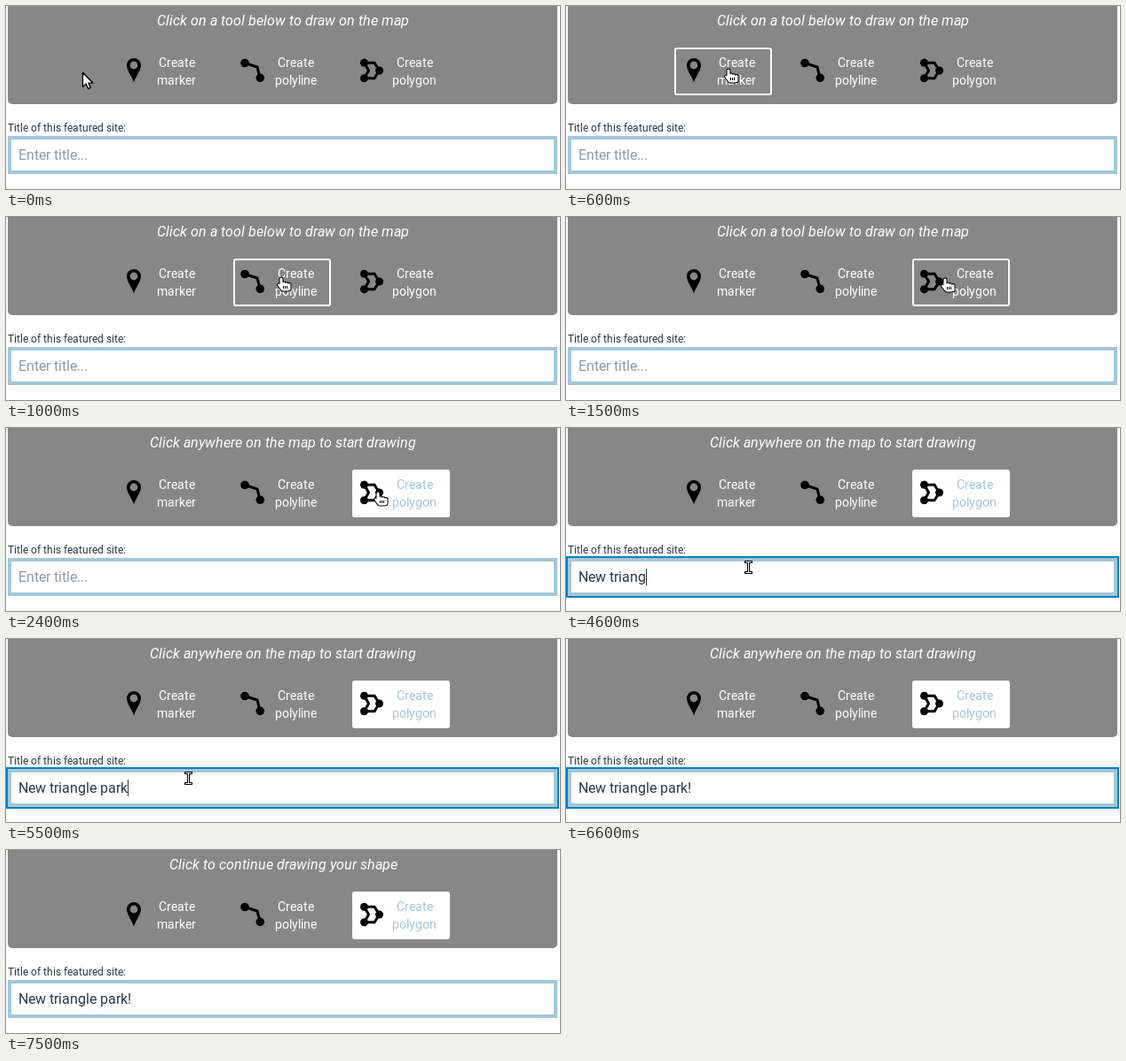
Recreate the animation shown at these times as an HTML page with a canvas. Size 624 by 207 pixels, loop 8 s.

```html
<!DOCTYPE html>
<html lang="en">
<head>
<meta charset="utf-8">
<title>Drawing tools</title>
<style>
html, body { margin: 0; width: 100%; height: 100%; overflow: hidden; background: #fff; }
canvas { display: block; width: 624px; height: 207px; }
</style>
</head>
<body>
<canvas id="stage" width="624" height="207"></canvas>
<script>
const ctx = document.getElementById('stage').getContext('2d');
const LOOP = 8000, STEP = 100;
const GRAY = '#878787', BLUE = '#a3c7d8', INK = '#2d3a44', FAINT = '#939ba2';

const tools = [
  { name: 'marker', icon: markerIcon },
  { name: 'polyline', icon: polylineIcon },
  { name: 'polygon', icon: polygonIcon }
];
tools.forEach((tool, i) => { tool.x = 122 + 134 * i; });

const hints = [
  [0, 'Click on a tool below to draw on the map'],
  [1800, 'Click anywhere on the map to start drawing'],
  [7400, 'Click to continue drawing your shape']
];

// [first step, number of steps, letters]
const bursts = [
  [3700, 2, 'New'], [4000, 1, ' t'], [4200, 5, 'riang'],
  [4800, 3, 'le '], [5300, 3, 'park'], [5700, 1, '!']
];

// [start, end, x, y]
const moves = [
  [200, 1100, 318, 69], [1100, 1500, 427, 70],
  [2300, 3200, 206, 158], [6300, 6500, 60, 146]
];

const clamp = u => Math.max(0, Math.min(1, u));
const smooth = u => u * u * (3 - 2 * u);
const fade = (t, from) => clamp((t - from + STEP) / (2 * STEP));

function pointerAt(t) {
  let x = 86, y = 75;
  for (const [start, end, toX, toY] of moves) {
    const k = smooth(clamp((t - start) / (end - start)));
    x += (toX - x) * k;
    y += (toY - y) * k;
  }
  return [Math.round(x), Math.round(y)];
}

function typedAt(t) {
  return bursts.map(([start, steps, letters]) => {
    const done = Math.max(0, Math.min(steps, (t - start) / STEP + 1));
    return letters.slice(0, Math.ceil(letters.length * done / steps));
  }).join('');
}

// Sets text with whole-pixel advances and returns its right edge.
function text(str, x, y, font, color, centered) {
  ctx.font = font + ' Roboto, sans-serif';
  ctx.fillStyle = color;
  const advance = ch => Math.round(ctx.measureText(ch).width);
  if (centered) {
    const width = [...str].reduce((sum, ch) => sum + advance(ch), 0);
    x = Math.round(x - width / 2);
  }
  for (const ch of str) {
    ctx.fillText(ch, x, y);
    x += advance(ch);
  }
  return x;
}

function rect(x, y, w, h, color) {
  ctx.fillStyle = color;
  ctx.fillRect(x, y, w, h);
}

function roundRect(x, y, w, h, r) {
  ctx.beginPath();
  ctx.roundRect(x, y, w, h, r);
}

function line(points, width, color, close) {
  ctx.beginPath();
  points.forEach(([x, y]) => ctx.lineTo(x, y));
  if (close) ctx.closePath();
  ctx.lineWidth = width;
  ctx.strokeStyle = color;
  ctx.stroke();
}

function dots(points, r) {
  ctx.fillStyle = '#000';
  for (const [x, y] of points) {
    ctx.beginPath();
    ctx.arc(x, y, r, 0, 7);
    ctx.fill();
  }
}

// Icons are placed relative to the button's top left corner.
function markerIcon() {
  ctx.beginPath();
  ctx.moveTo(22, 39.5);
  ctx.bezierCurveTo(20, 33, 14, 26, 14, 20);
  ctx.arc(22, 20, 8, Math.PI, 0);
  ctx.bezierCurveTo(30, 26, 24, 33, 22, 39.5);
  ctx.closePath();
  ctx.moveTo(26.4, 20);
  ctx.arc(22, 20, 4.4, 0, 2 * Math.PI);
  ctx.fillStyle = '#000';
  ctx.fill('evenodd');
}

function polylineIcon() {
  line([[13, 17.5], [27, 22], [30, 34]], 3, '#000');
  dots([[13, 17.5], [30.3, 34.3]], 4.8);
}

function polygonIcon() {
  const top = 17.3, mid = 26, bottom = 34.7;
  line([[13.5, top], [25, top], [30.5, mid], [25, bottom], [13.5, bottom], [18.5, mid]], 3, '#000', true);
  dots([[13.5, top], [13.5, bottom], [30.5, mid]], 4.5);
}

function drawTool(tool, hover, picked) {
  ctx.save();
  ctx.translate(tool.x, 47);
  if (hover) {
    roundRect(1, 1, 108, 52, 2);
    ctx.lineWidth = 2;
    ctx.strokeStyle = '#fff';
    ctx.stroke();
  }
  if (picked) {
    roundRect(0, 0, 110, 54, 3);
    ctx.fillStyle = `rgba(255,255,255,${picked})`;
    ctx.fill();
  }
  tool.icon();
  const color = picked ? BLUE : '#fff';
  text('Create', 70.5, 22, '14px', color, true);
  text(tool.name, 70, 42, '14px', color, true);
  ctx.restore();
}

function arrow() {
  line([[0.5, 0.5], [0.5, 16.3], [4.2, 12.9], [6.7, 18.6], [9.2, 17.4], [6.8, 12], [11.8, 12]], 1.2, '#000', true);
  ctx.fillStyle = '#fff';
  ctx.fill();
  ctx.stroke();
}

function hand() {
  const shape = new Path2D();
  shape.roundRect(-1.5, -0.5, 3, 11, 1.5);
  for (let i = 0; i < 3; i++) shape.roundRect(1.5 + 3 * i, 4.5 + 0.7 * i, 3, 8, 1.5);
  shape.roundRect(-0.5, 7.5, 10.5, 7, [1, 1, 3, 3]);
  shape.moveTo(-0.5, 13);
  shape.lineTo(-4.2, 7.5);
  shape.lineTo(-2.5, 6.5);
  shape.lineTo(0, 9);
  shape.closePath();
  ctx.lineWidth = 2;
  ctx.strokeStyle = '#000';
  ctx.stroke(shape);
  ctx.fillStyle = '#fff';
  ctx.fill(shape);
  for (let i = 0; i < 3; i++) rect(2 + 2 * i, 9, 1, 3, '#000');
}

function beam() {
  ctx.translate(-0.5, -0.5);
  ctx.lineCap = 'square';
  for (const [width, color] of [[3, '#000'], [1, '#fff']]) {
    line([[0, -6], [0, 6]], width, color);
    for (const y of [-6, 6]) line([[-3, y], [3, y]], width, color);
  }
}

function drawPointer(shape, x, y) {
  ctx.save();
  ctx.translate(x, y);
  ctx.lineJoin = 'round';
  shape();
  ctx.restore();
}

function drawField(t) {
  const focus = fade(t, 3100) - fade(t, 7400);
  rect(0, 145, 623, 47, `rgba(6,125,186,${focus})`);
  rect(2, 147, 619, 43, BLUE);
  rect(6, 151, 611, 35, '#fff');

  const value = typedAt(t);
  const end = text(value || 'Enter title...', 14, 174, '16px', value ? INK : FAINT);
  if (t >= 3100 && t < 6500) rect(value ? end : 14, 159, 1, 19, INK);
}

function draw(t) {
  const [x, y] = pointerAt(t);
  const picked = fade(t, 1800);
  const hovered = tools.find(b => x >= b.x && x < b.x + 110 && y >= 47 && y < 101);
  const hint = hints.filter(([start]) => start <= t).pop()[1];

  rect(0, 0, 624, 207, '#fff');
  roundRect(2, -10, 619, 121, 5);
  ctx.fillStyle = GRAY;
  ctx.fill();
  text(hint, 312, 22, 'italic 16px', '#fff', true);
  for (const tool of tools) {
    drawTool(tool, tool === hovered, tool.name === 'polygon' ? picked : 0);
  }
  text('Title of this featured site:', 2, 142, '12px', INK);
  drawField(t);

  if (t < 6600) {
    const overText = y >= 147 || (y >= 131 && x < 135);
    drawPointer(hovered ? hand : overText ? beam : arrow, x, y);
  }
}

function tick() {
  const t = performance.now() % LOOP;
  draw(Math.floor(t / STEP) * STEP);
  requestAnimationFrame(tick);
}
tick();
</script>
</body>
</html>
```
